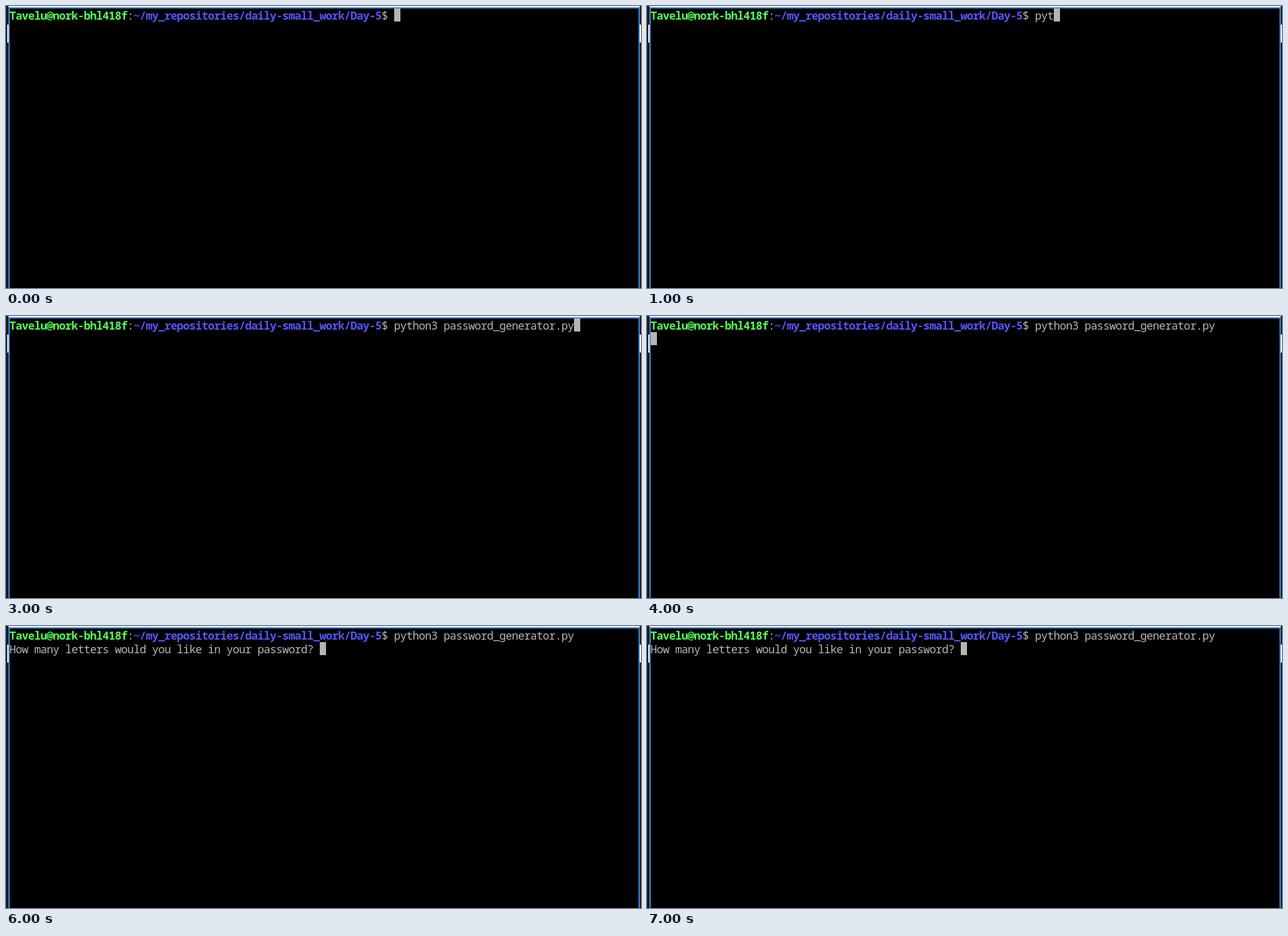
These frames come from a looping animation (1024x455 px, 8 s). An HTML page with a canvas:

```html
<!DOCTYPE html>
<html lang="en">
<head>
<meta charset="utf-8">
<title>Terminal</title>
<style>
  html, body { margin: 0; width: 100%; height: 100%; overflow: hidden; background: #000; }
  canvas { display: block; }
</style>
</head>
<body>
<canvas id="stage" width="1024" height="455"></canvas>
<script>
const ctx = document.getElementById('stage').getContext('2d');
const LOOP = 8000, CELL = 10, LINE = 22, LEFT = 6;
const GREY = '#b5b5b5', GREEN = '#55ff55', BLUE = '#5555ff';
const FONT = '18px "Noto Sans Mono", "DejaVu Sans Mono", monospace';
const COMMAND = 'python3 password_generator.py';
const QUESTION = 'How many letters would you like in your password? ';
const PROMPT = [
  ['Tavelu@nork-bhl418f', GREEN, true],
  [':', GREY],
  ['~/my_repositories/daily-small_work/Day-5', BLUE, true],
  ['$ ', GREY]
];
// Characters of the command visible in each second before Enter
const TYPED = [0, 3, 7, COMMAND.length];

ctx.textAlign = 'center';

function rect(color, x, y, w, h) {
  ctx.fillStyle = color;
  ctx.fillRect(x, y, w, h);
}

// Centres each character in its terminal cell and returns the next column
function write(text, col, row, color = GREY, bold = false) {
  ctx.font = (bold ? 'bold ' : '') + FONT;
  ctx.fillStyle = color;
  for (const char of text) {
    ctx.fillText(char, LEFT + (col + 0.5) * CELL, 22 + row * LINE);
    col++;
  }
  return col;
}

function drawWindow() {
  rect('#000', 0, 0, 1024, 455);
  rect('#1c1c20', 0, 0, 4, 455);
  rect('#1c1c20', 1022, 0, 2, 455);
  rect('#f4f4f4', 4, 0, 1018, 2);
  rect('#fff', 2, 30, 2, 29);
  rect('#fff', 1022, 30, 2, 29);
  rect('#3c8ce8', 4, 2, 1018, 2);
  rect('#3c8ce8', 4, 2, 2, 453);
  rect('#3c8ce8', 1020, 2, 2, 453);
}

function draw(time) {
  const second = Math.floor((time % LOOP) / 1000);
  const entered = second >= TYPED.length;
  drawWindow();

  let col = 0, row = 0;
  for (const [text, color, bold] of PROMPT) col = write(text, col, row, color, bold);
  col = write(entered ? COMMAND : COMMAND.slice(0, TYPED[second]), col, row);
  if (entered) {
    row = 1;
    col = second > TYPED.length ? write(QUESTION, 0, row) : 0;
  }
  rect(GREY, LEFT + col * CELL, 4 + row * LINE, CELL, 21);
}

const start = performance.now();
function tick() {
  draw(performance.now() - start);
  requestAnimationFrame(tick);
}
tick();
</script>
</body>
</html>
```
